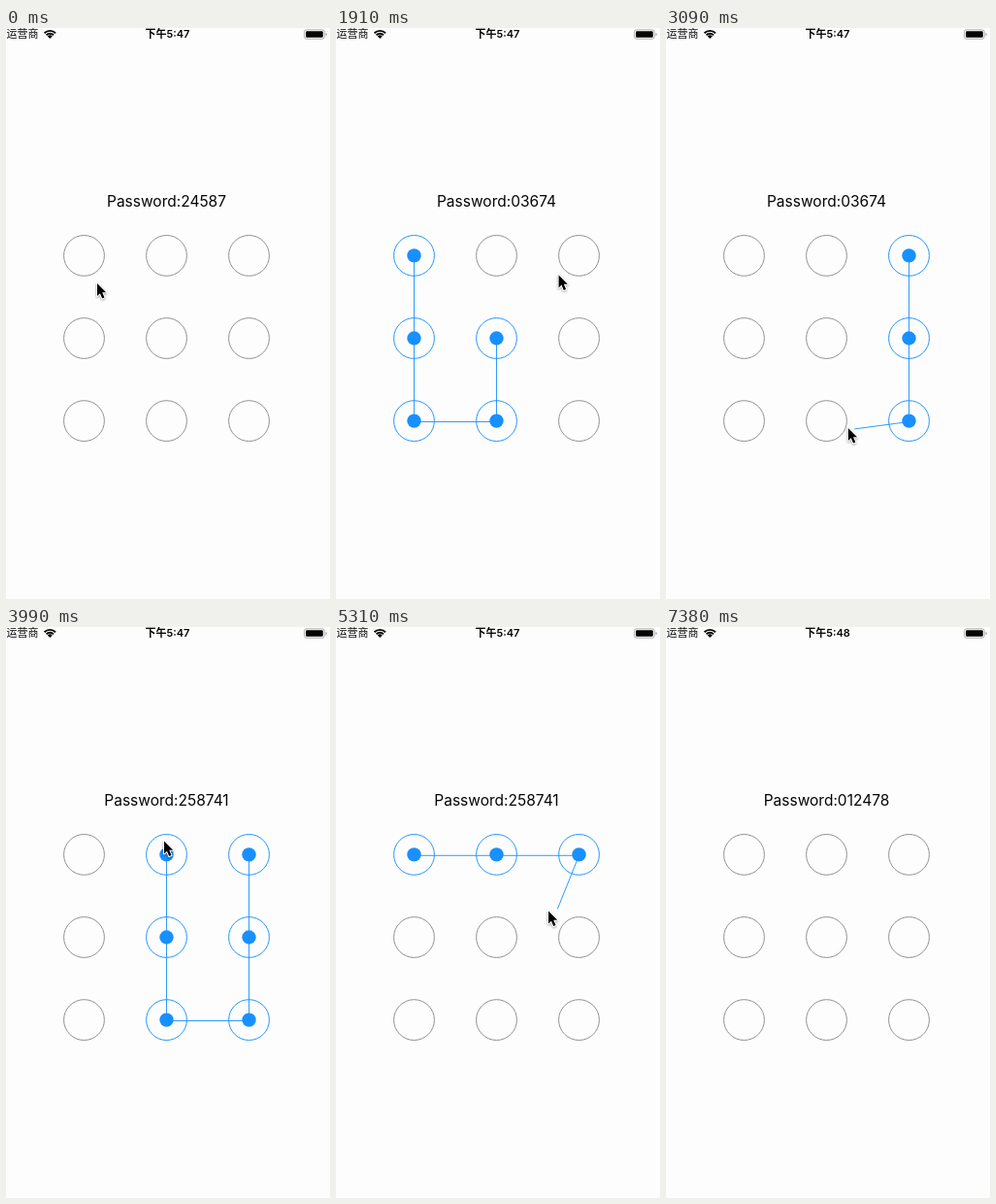
Animation of 334x588 px, one loop 7530 ms. Source, as an HTML page:

```html
<!DOCTYPE html>
<html lang="zh-CN">
<head>
<meta charset="utf-8">
<title>Pattern lock</title>
<style>
  html, body { margin: 0; width: 100%; height: 100%; overflow: hidden; background: #fdfdfd; }
  svg { display: block; width: 334px; height: 588px; }
  text { font-family: Inter, "Noto Sans CJK SC", "Noto Sans CJK", sans-serif; fill: #050505; }
  .ring { fill: none; stroke-width: .95; }
  .dot { fill: #1890ff; }
  #trail { fill: none; stroke: #1890ff; stroke-width: .9; }
  #cursor { filter: drop-shadow(0 1px 0.8px rgba(0, 0, 0, .35)); }
</style>
</head>
<body>
<svg viewBox="0 0 334 588">
  <rect width="334" height="588" fill="#fdfdfd"/>
  <text x="0.6" y="10.4" font-size="11">运营商</text>
  <g id="wifi" fill="none" stroke="#050505"></g>
  <text id="clock" x="166.5" y="10.4" font-size="11" font-weight="600" text-anchor="middle"></text>
  <rect x="307.5" y="1.8" width="20.8" height="9.4" rx="2.4" fill="none" stroke="#a6a6a6" stroke-width=".9"/>
  <rect x="309" y="3.2" width="17.8" height="6.6" rx="1.3" fill="#050505"/>
  <path d="M329.5 4.9q1.5 .5 1.5 1.6t-1.5 1.6z" fill="#a6a6a6"/>
  <text id="label" x="165.5" y="183.6" font-size="15.5" text-anchor="middle"></text>
  <g id="grid"></g>
  <path id="trail" transform="translate(0 .9)"/>
  <g id="cursor">
    <path d="M0 0V13L2.9 10.2L5.2 15.6L7.5 14.6L5.2 9.3H9.2Z" fill="#000"
          stroke="#fff" stroke-width="2" stroke-linejoin="round" paint-order="stroke"/>
  </g>
</svg>
<script>
const LOOP = 7530, FRAME = 147.5, EARLY = 15;
const LAG = 20, LINGER = 550, REACH = 21;
const $ = id => document.getElementById(id);

// The pointer runs along each leg at constant speed and rests in between
const start = [94, 263];
const legs = [
  { from: 100, to: 1320, via: [[80, 234], [80, 425], [165, 425], [166, 318]] },
  { from: 1660, to: 1988, via: [[247, 237]] },
  { from: 2060, to: 3090, via: [[246, 412], [191.5, 412]] },
  { from: 3090, to: 3540, via: [[164, 412], [163, 220.5]] },
  { from: 4000, to: 4580, via: [[31, 238]] },
  { from: 4740, to: 5310, via: [[245, 237], [230, 289], [219, 292.5]] },
  { from: 5310, to: 5920, via: [[166, 318], [165, 421], [264.5, 402]] },
  { from: 6800, to: 7300, via: [[334, 612]] }
];

const strokes = [
  { down: 150, up: 1470, code: "03674" },
  { down: 2060, up: 3970, code: "258741" },
  { down: 4800, up: 6330, code: "012478" }
];

const node = i => [80.5 + 85 * (i % 3), 234.4 + 85.1 * Math.floor(i / 3)];
const dist = (a, b) => Math.hypot(b[0] - a[0], b[1] - a[1]);
const mix = (a, b, k) => a.map((v, i) => v + (b[i] - v) * k);

function make(parent, tag, attrs) {
  const el = document.createElementNS("http://www.w3.org/2000/svg", tag);
  for (const k in attrs) el.setAttribute(k, attrs[k]);
  return parent.appendChild(el);
}

for (const [r, w] of [[8.1, 1.9], [5.2, 1.9], [1.75, 3.5]]) {
  const d = r * Math.SQRT1_2;
  make($("wifi"), "path", {
    d: `M${45.3 - d} ${11 - d}A${r} ${r} 0 0 1 ${45.3 + d} ${11 - d}`, "stroke-width": w
  });
}

const cells = Array.from({ length: 9 }, (_, i) => {
  const [cx, cy] = node(i);
  return {
    ring: make($("grid"), "circle", { class: "ring", cx, cy, r: 20.9 }),
    dot: make($("grid"), "circle", { class: "dot", cx, cy, r: 7.2 })
  };
});

// Point at fraction k of a polyline's length
function along(points, k) {
  const lengths = points.slice(1).map((p, i) => dist(points[i], p));
  let left = k * lengths.reduce((a, b) => a + b);
  for (let i = 0; i < lengths.length; i++) {
    if (left < lengths[i]) return mix(points[i], points[i + 1], left / lengths[i]);
    left -= lengths[i];
  }
  return points[points.length - 1];
}

function pointer(t) {
  let at = start;
  for (const { from, to, via } of legs) {
    if (t <= from) break;
    at = along([at, ...via], Math.min(1, (t - from) / (to - from)));
  }
  return at;
}

// Nodes the finger has entered by time t
function visited({ down, code }, t) {
  let n = 0;
  for (let s = down; s <= t && n < code.length; s += 5) {
    const [x, y] = pointer(s), [cx, cy] = node(+code[n]);
    if (Math.abs(x - cx) <= REACH && Math.abs(y - cy) <= REACH) n++;
  }
  return [...code].slice(0, n).map(Number);
}

function draw(now) {
  const t = Math.floor((now + EARLY) / FRAME) * FRAME;
  const stroke = strokes.find(s => t >= s.down && t < s.up + LINGER);
  const hits = stroke ? visited(stroke, t - LAG) : [];
  const points = hits.map(node);
  if (points.length && t < stroke.up) points.push(pointer(t - LAG));

  cells.forEach(({ ring, dot }, i) => {
    const on = hits.includes(i);
    ring.setAttribute("stroke", on ? "#1890ff" : "#8c8c8c");
    dot.setAttribute("visibility", on ? "visible" : "hidden");
  });
  $("trail").setAttribute("d", points.length ? "M" + points.join("L") : "");
  $("cursor").setAttribute("transform", `translate(${pointer(t)})`);

  const done = strokes.filter(s => t >= s.up).pop();
  $("label").textContent = "Password:" + (done ? done.code : "24587");
  $("clock").textContent = t < 5590 ? "下午5:47" : "下午5:48";
}

function loop() {
  draw(performance.now() % LOOP);
  requestAnimationFrame(loop);
}
loop();
</script>
</body>
</html>
```
